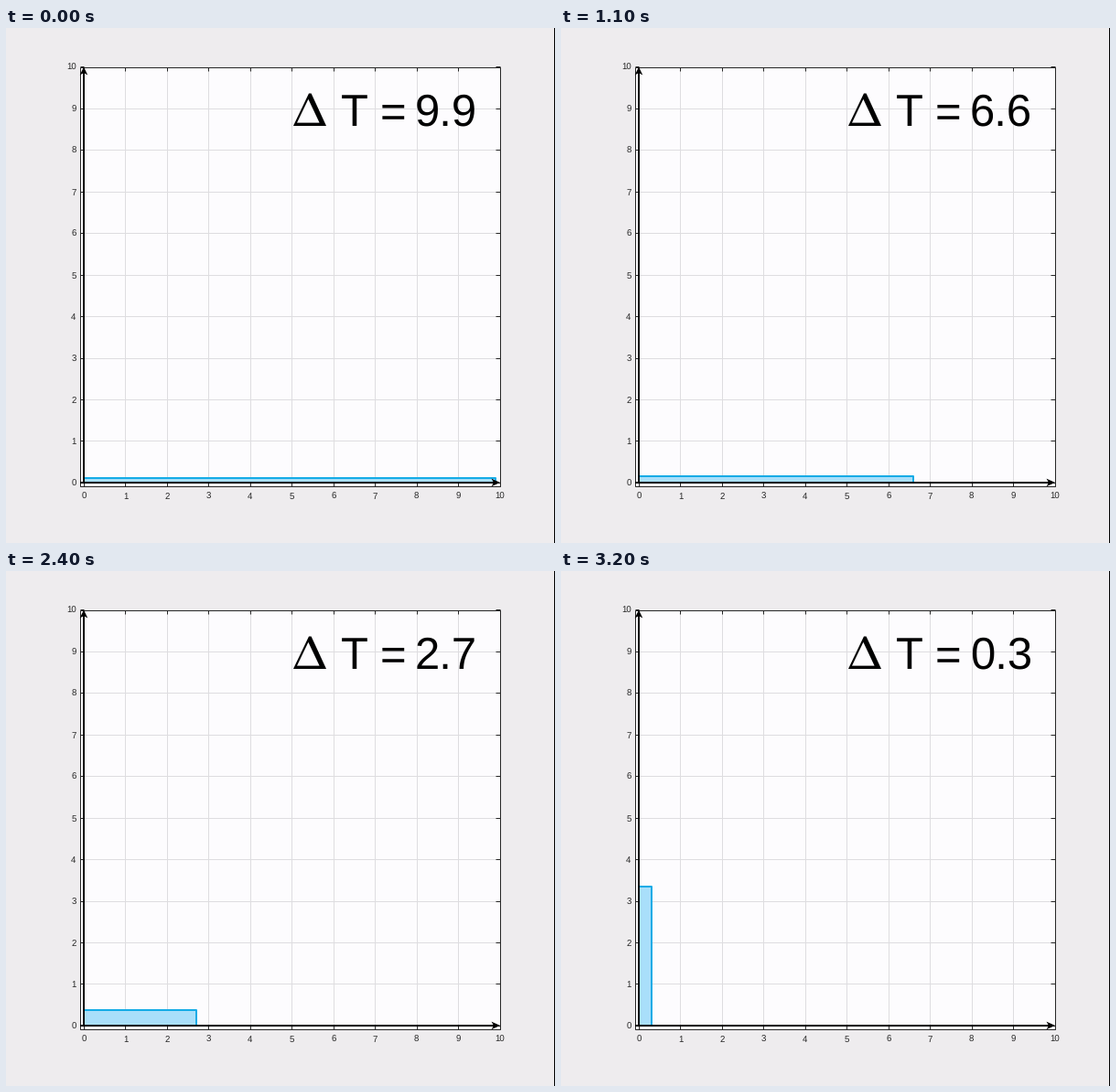
These frames come from a looping animation (600x563 px, 3.3 s). A matplotlib script:

```python
import matplotlib.pyplot as plt
from matplotlib.animation import FuncAnimation
from matplotlib.collections import LineCollection
from matplotlib.patches import Polygon, Rectangle

W, H, DPI = 600, 563, 100
FRAMES, INTERVAL = 33, 100
X0, Y0, UNIT = 85.0, 496.9, 45.45
LEFT, RIGHT, TOP, BOTTOM = 80.5, 539.5, 42.5, 501.0
TICK = 4.5
INK = "#262626"

plt.rcParams["font.family"] = "Liberation Sans"
plt.rcParams["text.hinting"] = "none"


def px(n):
    """Pixels to points."""
    return n * 72 / DPI


def sx(v):
    return X0 + UNIT * v


def sy(v):
    return Y0 - UNIT * v


fig = plt.figure(figsize=(W / DPI, H / DPI), dpi=DPI, facecolor="#eeecee")
ax = fig.add_axes([0, 0, 1, 1])
ax.set_xlim(0, W)
ax.set_ylim(H, 0)
ax.axis("off")


def lines(segments, color, width, z):
    ax.add_collection(LineCollection(segments, colors=color,
                                     linewidths=px(width), zorder=z))


def shape(points, color, z):
    ax.add_patch(Polygon(points, closed=True, fc=color, ec="none", zorder=z))


def label(x, y, text, size, color=INK, **align):
    return ax.text(x, y, text, fontsize=px(size), color=color, zorder=6, **align)


# Plot area, grid, ticks and box
ax.add_patch(Rectangle((LEFT, TOP), RIGHT - LEFT, BOTTOM - TOP,
                       fc="#fdfcfe", ec="none", zorder=0))
grid, ticks = [], []
for k in range(11):
    x, y = sx(k), sy(k)
    if 0 < k < 10:
        grid += [[(x, TOP), (x, BOTTOM)], [(LEFT, y), (RIGHT, y)]]
    ticks += [[(x, TOP), (x, TOP + TICK)], [(x, BOTTOM), (x, BOTTOM - TICK)],
              [(LEFT, y), (LEFT + TICK, y)], [(RIGHT, y), (RIGHT - TICK, y)]]
    label(x, 515, str(k), 9.6, ha="center", va="baseline")
    label(76.5, y + 4, str(k), 9.6, ha="right", va="baseline")
lines(grid, "#dedde0", 1, 1)
lines(ticks, INK, 1, 2)
ax.add_patch(Rectangle((LEFT, TOP), RIGHT - LEFT, BOTTOM - TOP,
                       fc="none", ec=INK, lw=px(1), zorder=2))

# Axis arrows
lines([[(LEFT, Y0), (RIGHT - 4, Y0)], [(X0, Y0), (X0, TOP + 4)]], "black", 2, 4)
shape([(RIGHT + 0.5, Y0), (530.5, Y0 - 4.3), (533, Y0), (530.5, Y0 + 4.3)],
      "black", 5)
shape([(X0, TOP), (X0 - 4.3, 51.5), (X0, 49), (X0 + 4.3, 51.5)], "black", 5)

# Dark strip along the right side of the stage
ax.add_patch(Rectangle((W - 1, 0), 1, H, fc="black", ec="none", zorder=0))

# Heading: delta, then "T = value"
shape([(314, 107), (331, 71.5), (333.6, 71.5), (350, 107)], "black", 6)
shape([(318, 103.6), (330.4, 77.8), (342.6, 103.6)], "#fdfcfe", 6)
for x, text in ((366, "T"), (408.5, "=")):
    label(x, 107, text, 49, "black", va="baseline")
value = label(447, 107, "", 49, "black", va="baseline")

# Pulse of unit area
pulse = Rectangle((X0, Y0), 0, 0, fc="#a9dffa", ec="#14abe6", lw=px(2),
                  joinstyle="round", zorder=3)
ax.add_patch(pulse)


def update(i):
    width = 9.9 - 0.3 * i
    pulse.set_bounds(X0, Y0, UNIT * width, -UNIT / width)
    value.set_text(f"{width:.1f}")
    return pulse, value


anim = FuncAnimation(fig, update, frames=FRAMES, interval=INTERVAL,
                     repeat=True, repeat_delay=0)
plt.show()
```
